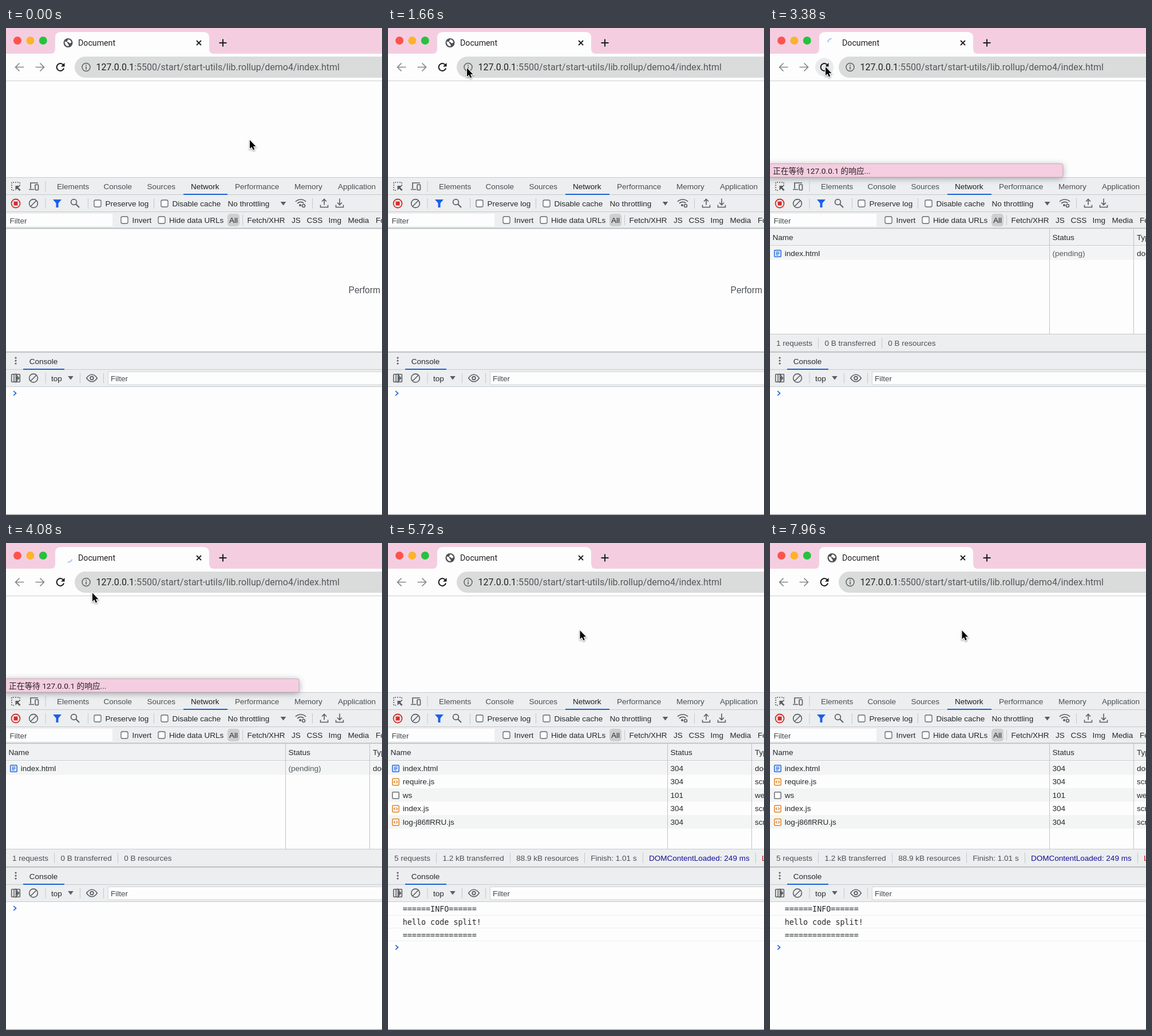
Recreate the animation shown at these times as an HTML page with a canvas. Size 657x852 px, loop 8000 ms.

```html
<!DOCTYPE html>
<html lang="en">
<head>
<meta charset="utf-8">
<title>Document</title>
<style>
html, body { margin: 0; width: 100%; height: 100%; overflow: hidden; background: #fdfdfd; }
canvas { display: block; width: 657px; height: 852px; }
</style>
</head>
<body>
<canvas id="stage" width="657" height="852"></canvas>
<script>
const c = document.getElementById('stage').getContext('2d');
const W = 657, H = 852, LOOP = 8000;
const SANS = '13.5px "Liberation Sans", Arial, sans-serif';
const UI = '"Roboto", "Noto Sans CJK SC", "Noto Sans CJK", sans-serif';
const MONO = '13.4px "DejaVu Sans Mono", monospace';
const PAPER = '#fdfdfd', BAR = '#eceeef', PINK = '#f4cee0', LINE = '#c6cbcf';
const INK = '#25282b', GREY = '#5a5e62', BLUE = '#1a62d6', ORANGE = '#df8420';

// Times of the page events, in ms
const RELOAD = 3340, LOADED = 4180, LOGGED = 5000;
const FADE = [4460, 4720];
const PATH = [
  [150, 426, 196], [1350, 138, 70], [1660, 138, 70], [2150, 97, 68],
  [3850, 97, 68], [4600, 335.5, 153]
];

function box(x, y, w, h, color) {
  c.fillStyle = color;
  c.fillRect(x, y, w, h);
}
function round(x, y, w, h, r, fill, stroke, lw = 1.4) {
  c.beginPath();
  c.roundRect(x, y, w, h, r);
  if (fill) { c.fillStyle = fill; c.fill(); }
  if (stroke) { c.strokeStyle = stroke; c.lineWidth = lw; c.stroke(); }
}
function text(s, x, y, color = INK, font = SANS) {
  c.font = font;
  c.fillStyle = color;
  c.fillText(s, x, y);
}
function disc(x, y, r, color) {
  c.beginPath();
  c.arc(x, y, r, 0, 7);
  c.fillStyle = color;
  c.fill();
}
function arc(x, y, r, color, lw, from = 0, to = Math.PI * 2) {
  c.beginPath();
  c.arc(x, y, r, from, to);
  c.strokeStyle = color;
  c.lineWidth = lw;
  c.stroke();
}
function path(d, x, y, color, lw) {
  c.save();
  c.translate(x, y);
  const p = new Path2D(d);
  if (lw) {
    c.strokeStyle = color;
    c.lineWidth = lw;
    c.stroke(p);
  } else {
    c.fillStyle = color;
    c.fill(p);
  }
  c.restore();
}
const rule = (y, color = LINE, h = 1) => box(0, y, W, h, color);
const sep = (x, y) => box(x, y - 9, 1, 18, '#c3c9ce');
const check = (x, y) => round(x - 6, y - 6, 12, 12, 2.5, PAPER, '#65696d', 1.3);
const caret = (x, y) => path('M-4.8-3H4.8L0 3.5Z', x, y, GREY);
function blocked(x, y) {
  arc(x, y, 7.4, GREY, 1.6);
  path('M-5 5L5-5', x, y, GREY, 1.6);
}

function globe(x, y) {
  disc(x, y, 8, '#4c5054');
  path('M-6-2C-3-3-1-1-1 1L1 3V6C-3 6-6 3-6-2ZM0-6C3-6 5-4 6-1L3 1 1-1-2-2-1-4Z', x, y, PAPER);
}

function chrome(t) {
  box(0, 0, W, 45, PINK);
  path('M78 45Q86 45 86 36V17Q86 7 96 7H345Q355 7 355 17V36Q355 45 363 45Z', 0, 0, PAPER);
  ['#fe534d', '#fdb32b', '#26c23e'].forEach((color, i) => disc(20 + 22.4 * i, 22, 7, color));

  if (t >= RELOAD && t < LOADED) {
    const a = 3.3 - (t - RELOAD - 40) / 1500 * Math.PI * 2;
    arc(108.5, 26, 7.5, '#a6c3f2', 2, a, a + 1.3);
  } else {
    globe(108.5, 26);
  }
  text('Document', 126, 31, '#222', '14.2px ' + UI);
  path('M-4-4L4 4M4-4L-4 4', 337, 26, '#222', 1.9);
  path('M-6.5 0H6.5M0-6.5V6.5', 379, 26, '#1c1c1c', 2);

  path('M8 0H-7M0-7L-7 0 0 7', 23.5, 68.5, '#84878a', 1.7);
  path('M-8 0H7M0-7L7 0 0 7', 59.5, 68.5, '#84878a', 1.7);
  const [mx, my] = pointer(t);
  if (Math.hypot(mx - 95, my - 68.5) < 16) disc(95, 68.5, 16, '#e9eaeb');
  arc(95, 68.5, 6.4, '#17191b', 2, 0.3, 5.6);
  path('M7.5-7.5V-1H1Z', 95, 68.5, '#17191b');

  round(120, 50, 600, 37, 18.5, '#dadbdb');
  arc(140, 68.5, 7, '#5f6367', 1.5);
  box(139.2, 67.5, 1.7, 5, '#5f6367');
  box(139.2, 64.3, 1.7, 1.8, '#5f6367');
  const font = '16px ' + UI, host = '127.0.0.1';
  text(host, 157.5, 74, '#202124', font);
  text(':5500/start/start-utils/lib.rollup/demo4/index.html',
    157.5 + c.measureText(host).width, 74, '#55585c', font);
  rule(92, '#cbcdcf');
}

function devtools() {
  box(0, 262, W, 88, BAR);
  rule(261);
  rule(291);
  rule(321);
  rule(349.5, '#b9c0c1', 2);

  // Tab row
  c.setLineDash([2, 2]);
  path('M14 6V0H0V14H6', 10, 270, GREY, 1.6);
  c.setLineDash([]);
  path('M0 0H8L5 3 9 7 7 9 3 5 0 8Z', 16.5, 276, GREY);
  path('M3 11V1H16M0 12.5H9', 40, 270, GREY, 1.7);
  round(51, 274, 5.5, 9.5, 1, BAR, GREY, 1.6);
  sep(68.5, 277);
  const tabs = { Elements: 89, Console: 170.5, Sources: 246.5, Network: 323,
    Performance: 400, Memory: 504, Application: 580 };
  for (const name in tabs) text(name, tabs[name], 282, name === 'Network' ? '#1b1d1f' : '#4a4e52');
  box(310, 290, 77, 2, BLUE);

  // Capture row
  arc(17, 307, 7.5, '#d32f2c', 1.8);
  box(13.5, 303.5, 7, 7, '#d32f2c');
  blocked(48, 307);
  sep(68.5, 307);
  path('M-7.5-7H7.5L2-.5V7H-2V-.5Z', 89.5, 307, '#1b5ff2');
  arc(118.5, 304.5, 4.9, GREY, 1.7);
  path('M0 0L6 6', 122, 308, GREY, 1.9);
  sep(143, 307);
  check(160, 307);
  text('Preserve log', 173.5, 312);
  sep(258, 307);
  check(277, 307);
  text('Disable cache', 290.5, 312);
  text('No throttling', 387.5, 312);
  caret(484.5, 307);
  arc(515, 313, 13, GREY, 1.6, -2.35, -0.8);
  arc(515, 313, 8.6, GREY, 1.6, -2.35, -0.9);
  disc(514, 310, 2, GREY);
  arc(520, 311, 2.5, GREY, 1.6);
  sep(535, 307);
  const tray = 'M-6.5 3V7H6.5V3';
  path(tray + 'M0 3V-7M-4-3L0-7 4-3', 556, 306.5, GREY, 1.6);
  path(tray + 'M0 3V-8M-4-1L0 3 4-1', 583, 306.5, GREY, 1.6);

  // Filter row
  box(1, 325, 185, 22, PAPER);
  text('Filter', 6.5, 342, '#44484c');
  check(207, 336);
  text('Invert', 220.5, 341);
  check(272, 336);
  text('Hide data URLs', 285, 341);
  round(387, 325, 21, 22, 5, '#cecfcf');
  sep(413, 336);
  const kinds = { All: 390, 'Fetch/XHR': 421.5, JS: 499, CSS: 525.5, Img: 563.5, Media: 597.5, Font: 646 };
  for (const name in kinds) text(name, kinds[name], 341);
}

const ROWS = [
  ['index.html', '304', 'document', 'doc'],
  ['require.js', '304', 'script', 'js'],
  ['ws', '101', 'websocket', 'ws'],
  ['index.js', '304', 'script', 'js'],
  ['log-j86flRRU.js', '304', 'script', 'js']
];

function fileIcon(kind, y) {
  const color = { doc: BLUE, js: ORANGE, ws: '#6a6e72' }[kind];
  round(7.7, y - 5.7, 11.4, 11.4, 1.5, PAPER, color, 1.5);
  if (kind === 'doc') path('M-3.3-2.7H3.3M-3.3 0H3.3M-3.3 2.7H1.5', 13.4, y, color, 1.3);
  if (kind === 'js') path('M-1-2.3L-3.2 0-1 2.3M1-2.3L3.2 0 1 2.3', 13.4, y, color, 1.3);
}

function summary(items) {
  let x = 11;
  items.forEach((s, i) => {
    if (i) sep(Math.round(x - 11), 551);
    text(s, x, 556, i === 4 ? '#10109a' : i === 5 ? '#c8110d' : '#4d5155');
    x += c.measureText(s).width + 21.4;
  });
}

function network(t) {
  if (t < RELOAD) {
    text('Perform a request', 598.5, 464, '#4d5155', '15.6px "Liberation Sans", Arial, sans-serif');
    return;
  }
  const count = t < LOADED ? 1 : t < LOGGED ? 4 : 5;
  box(0, 351.5, W, 29, '#f0f1f2');
  ROWS.slice(0, count).forEach(([name, status, type, kind], i) => {
    const y = 394 + i * 23.5;
    if (i % 2 === 0) box(0, y - 12, W, 23.5, '#f3f4f4');
    fileIcon(kind, y + 0.5);
    text(name, 25.7, y + 4.7);
    text(count === 1 ? '(pending)' : status, 493.5, y + 4.7, count === 1 ? '#55595d' : INK);
    text(type, 641, y + 4.7);
  });
  text('Name', 4.5, 371.3);
  text('Status', 493.5, 371.3);
  text('Type', 641, 371.3);
  rule(380);
  box(488, 351, 1, 185, '#bfc4c8');
  box(635, 351, 1, 185, '#bfc4c8');
  box(0, 536, W, 30, BAR);
  rule(535);
  summary(count === 1 ? ['1 requests', '0 B transferred', '0 B resources']
    : count === 4 ? ['4 requests', '890 B transferred', '88.7 kB resources', 'Finish: 488 ms',
      'DOMContentLoaded: 249 ms', 'Load: 249 ms']
    : ['5 requests', '1.2 kB transferred', '88.9 kB resources', 'Finish: 1.01 s',
      'DOMContentLoaded: 249 ms', 'Load: 249 ms']);
}

function drawer(t) {
  box(0, 567, W, 60, BAR);
  rule(565.8, '#b9c0c1', 2);
  rule(597);
  rule(627);
  for (const y of [577, 582, 587]) disc(17, y, 1.6, GREY);
  text('Console', 40.7, 587.5);
  box(30, 596, 72, 2, BLUE);

  round(9.7, 605.7, 14.6, 13.6, 1, null, GREY, 1.6);
  path('M4.5 0V13M8-.2V13.2L13 6.5Z', 9.5, 606, GREY, 1.5);
  path('M8 2.5V10.5L12.5 6.5Z', 9.5, 606, GREY);
  blocked(48, 612.5);
  sep(68.5, 612.5);
  text('top', 79, 617.5);
  caret(113, 612);
  sep(129, 612.5);
  path('M-9.3 0Q-5-6.2 0-6.2T9.3 0Q5 6.2 0 6.2T-9.3 0Z', 150, 612.5, GREY, 1.6);
  arc(150, 612.5, 2.8, GREY, 1.8);
  sep(170, 612.5);
  round(178.5, 601.5, 500, 22.5, 0, PAPER, '#d0d4d7', 1);
  text('Filter', 183, 618, '#44484c');

  let y = 639;
  if (t >= LOGGED) {
    ['======INFO======', 'hello code split!', '================'].forEach((s, i) => {
      text(s, 25.7, 644.5 + i * 23, INK, MONO);
      rule(651 + i * 22.3, '#eceeef');
    });
    y = 707.5;
  }
  path('M-2.3-3.8L2 0-2.3 3.8', 15.5, y, '#2468d8', 1.7);
}

function bubble(t) {
  if (t < RELOAD || t > FADE[1]) return;
  c.save();
  c.globalAlpha = Math.min(1, (FADE[1] - t) / (FADE[1] - FADE[0]));
  c.shadowColor = 'rgba(0,0,0,.35)';
  c.shadowBlur = 12;
  c.shadowOffsetY = 2;
  round(-4, 237.5, 516, 23.5, 3, PINK);
  c.shadowColor = 'transparent';
  round(-4, 237.5, 516, 23.5, 3, null, '#c8aebb', 1);
  text('正在等待 127.0.0.1 的响应...', 5, 254.5, '#26211f', '13.7px ' + UI);
  c.restore();
}

function pointer(t) {
  let a = PATH[0];
  for (const b of PATH) {
    if (t < b[0]) {
      const u = Math.max(0, (t - a[0]) / (b[0] - a[0] || 1));
      const e = t < a[0] ? 0 : u * u * (3 - 2 * u);
      return [a[1] + (b[1] - a[1]) * e, a[2] + (b[2] - a[2]) * e];
    }
    a = b;
  }
  return [a[1], a[2]];
}

function cursor(t) {
  const [x, y] = pointer(t);
  const d = 'M0 0V15L3.4 11.9 5.8 17.3 8.3 16.2 6 11H10.5Z';
  c.save();
  c.shadowColor = 'rgba(0,0,0,.4)';
  c.shadowBlur = 3;
  c.shadowOffsetY = 1.5;
  path(d, x, y, '#fff', 2.2);
  c.restore();
  path(d, x, y, '#050505');
}

function draw(t) {
  box(0, 0, W, H, PAPER);
  chrome(t);
  devtools();
  network(t);
  drawer(t);
  bubble(t);
  rule(851, '#85878a');
  cursor(t);
}

const start = performance.now();
function tick() {
  draw((performance.now() - start) % LOOP);
  requestAnimationFrame(tick);
}
tick();
</script>
</body>
</html>
```
